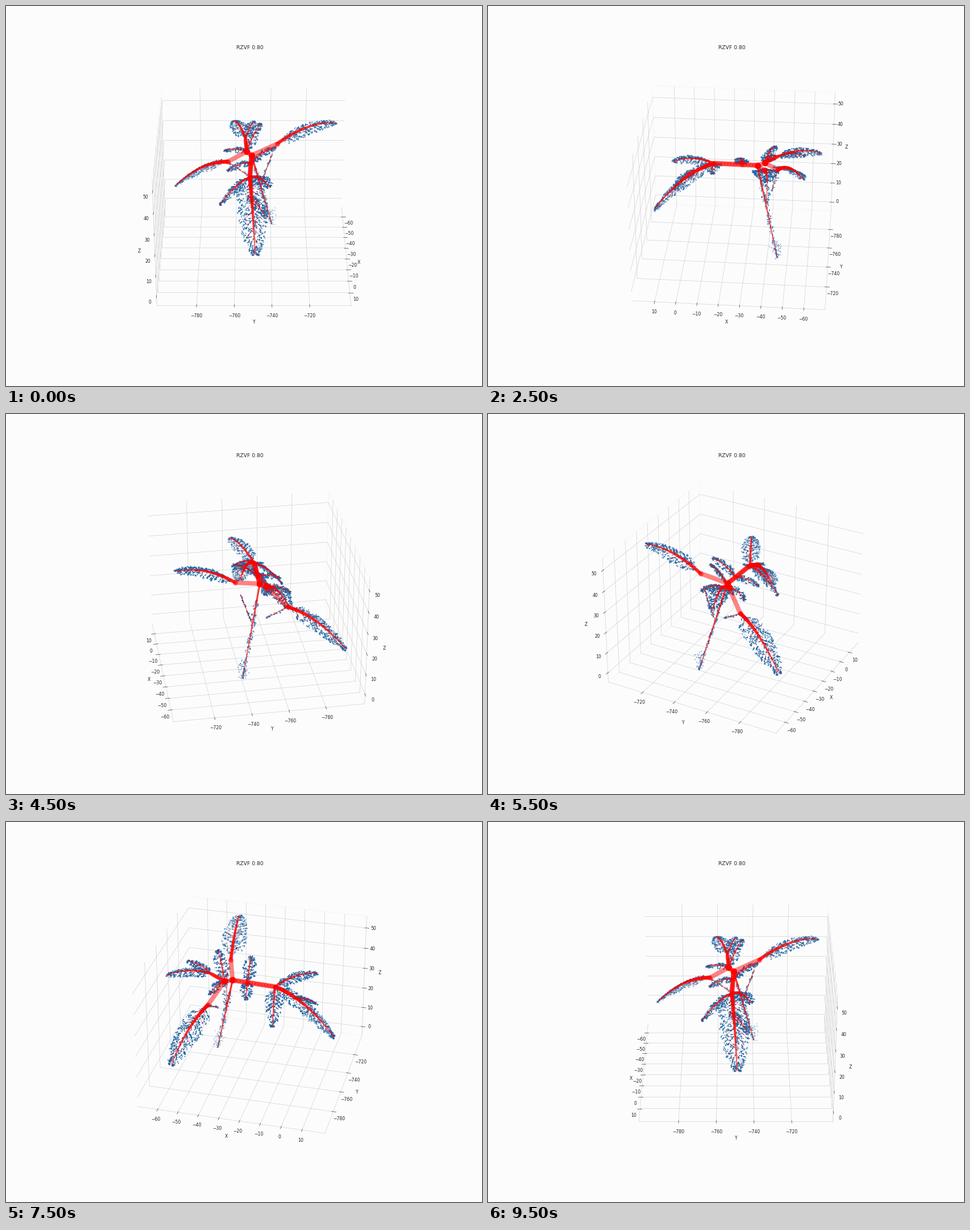
Write a matplotlib script that moves like this. It is 837 px wide and 669 px high and loops after 10 s.

```python
import numpy as np
import matplotlib.pyplot as plt
from matplotlib.animation import FuncAnimation
from mpl_toolkits.mplot3d.art3d import Line3DCollection

WIDTH, HEIGHT, DPI = 837, 669, 55.8
FRAMES, INTERVAL = 20, 500
PT = 72 / DPI  # points per pixel
BACK, RED, BLUE = "#fcfcfc", "#ff0000", "#1f66a4"
UP = np.array([0, 0, 1.0])

# The plant is modelled in pixel-like units around the middle of the box.
CENTER = np.array([-24.6, -749.6, 25.55])
SCALE = np.array([3.644, 3.218, 4.111])

plt.rcParams.update({
    "font.family": "DejaVu Sans", "text.color": ".15", "axes.labelcolor": ".15",
    "xtick.color": ".15", "ytick.color": ".15", "axes.edgecolor": ".8",
    "grid.color": ".8", "grid.linestyle": "-",
})
rng = np.random.default_rng(4)
segments, widths, dots = [], [], []


def to_data(points):
    return CENTER + np.asarray(points) / SCALE


def add_line(curve, start, end):
    for i, pair in enumerate(zip(curve, curve[1:])):
        segments.append(to_data(pair))
        widths.append((start + (end - start) * i / len(curve)) * PT)


def add_stem(a, b, width, pieces=1):
    add_line(np.linspace(a, b, pieces + 1), width, width)


class Blade:
    """An arched midrib with a flat outline; its size follows from its length."""

    def __init__(self, base, tip, slim=False):
        self.base, self.axis = np.array(base, float), np.subtract(tip, base)
        self.length = np.linalg.norm(self.axis)
        self.slim = slim
        self.arch = 0 if slim else 0.1 * self.length
        self.half = 5 if slim else 4 + 0.16 * self.length
        side = np.cross(self.axis, UP)
        self.side = side / np.linalg.norm(side)

    def place(self, t, reach=0.0):
        t = np.clip(t, 0, 1)
        spread = reach * self.half * (0.2 + 0.8 * np.sin(np.pi * t**0.85) ** 0.7)
        rise = 4 * t * (1 - t) * self.arch - 0.2 * np.abs(spread)
        return (self.base + np.outer(t, self.axis) + np.outer(spread, self.side)
                + np.outer(rise, UP))

    def draw(self):
        thick = (0.02 if self.slim else 0.058) * self.length
        rib = self.place(np.linspace(0, 1, int(self.length / 2.2)))
        add_line(rib, max(thick, 1.2), 1.2)

        roots = np.arange(0.08, 0.97, 7 / self.length)
        if not self.slim:
            for root in roots[1::2]:
                for sign in (-1, 1):
                    reach = np.linspace(0, rng.uniform(0.2, 0.8), 5)
                    add_line(self.place(root + 0.13 * reach, sign * reach), 1, 0.7)

        # Small clumps of dots strung along the side veins
        clumps = int(self.length * (0.4 if self.slim else 2.1))
        size = 3
        root = np.repeat(rng.choice(roots, clumps), size)
        reach = np.repeat(rng.uniform(0.02, 1, clumps), size)
        reach = np.clip(reach + rng.normal(0, 0.06, len(reach)), 0, 1)
        sign = np.repeat(rng.choice([-1, 1], clumps), size)
        jitter = np.repeat(rng.normal(0, 1.3, clumps), size) / self.length
        points = self.place(root + 0.13 * reach + jitter, sign * reach)
        dots.append(points + rng.normal(0, 0.8, points.shape))


# Joints of the trunk
HUB, NECK, FORK = (-37, -4, 57), (-49, -13, 58), (39.5, -7, 56)
MIDDLE, SHOULDER = (-10, -5, 57), (74, -11, 39)
RIGHT, LEFT, TOP = (-52, 41, 72), (-70, -46.5, 26), (-72.5, -15, 70.7)

# Long single edges stay translucent, chopped ones build up to solid red
for a, b in ((HUB, RIGHT), (NECK, LEFT), (HUB, NECK)):
    add_stem(a, b, 8)
add_stem(HUB, FORK, 8.5, 14)
add_stem(NECK, TOP, 6.5, 12)

LEAVES = [
    (FORK, (144, 2, -35)), (RIGHT, (-63, 144, 109)), (LEFT, (-110, -142, -44)),
    (TOP, (-147, -36, 69)), (TOP, (-118, 0, 82)), (FORK, (107, 26, 75)),
    (FORK, (48, -58, 7)), (SHOULDER, (108, 21, 16)), (NECK, (-67, 12, 104)),
    (MIDDLE, (-14, 38, 85)), (MIDDLE, (-2, -46, 46)), (NECK, (-64, -52, 52)),
]
TWIGS = [
    (HUB, (-75.5, 32.5, -107)), ((-54, 12, -12), (-57, 33, 51)), (LEFT, (-62, -12, 3)),
]
for base, tip in LEAVES:
    Blade(base, tip).draw()
for base, tip in TWIGS:
    Blade(base, tip, slim=True).draw()
dots.append(rng.normal((-73, 31, -92), (4, 4, 9), (50, 3)))

fig = plt.figure(figsize=(WIDTH / DPI, HEIGHT / DPI), dpi=DPI, facecolor=BACK)
ax = fig.add_subplot(projection="3d", computed_zorder=False)
ax.set_facecolor("none")
ax.set_title("RZVF 0.80")
ax.set(xlabel="X", ylabel="Y", zlabel="Z")

ax.scatter(*to_data(np.vstack(dots)).T, s=2, linewidths=0.8, c=BLUE, zorder=2)
ax.add_collection3d(Line3DCollection(segments, colors=RED, linewidths=widths,
                                     alpha=0.48, capstyle="round", zorder=3))


def add_joints(points, size, alpha):
    ax.scatter(*to_data(points).T, s=(size * PT) ** 2, c=RED, alpha=alpha,
               linewidths=0, depthshade=False, zorder=4)


add_joints([HUB, NECK], 11.5, 1)
add_joints([FORK, MIDDLE, RIGHT, LEFT], 9, 0.48)

ax.set_xticks(range(-60, 11, 10))
ax.set_yticks(range(-780, -719, 20))
ax.set_zticks(range(0, 51, 10))
ax.set_xlim(-69.9, 20.85)
ax.set_ylim(-801.1, -698.1)
ax.set_zlim(-4.67, 55.78)
for axis in (ax.xaxis, ax.yaxis, ax.zaxis):
    axis.pane.set_facecolor("none")
    axis.pane.set_edgecolor("none")
ax.yaxis.pane.set_edgecolor(".93")


def draw(i):
    ax.view_init(elev=30, azim=360 * i / (FRAMES - 1))
    return []


anim = FuncAnimation(fig, draw, frames=FRAMES, interval=INTERVAL, repeat=True,
                     repeat_delay=0, blit=False)
plt.show()
```
